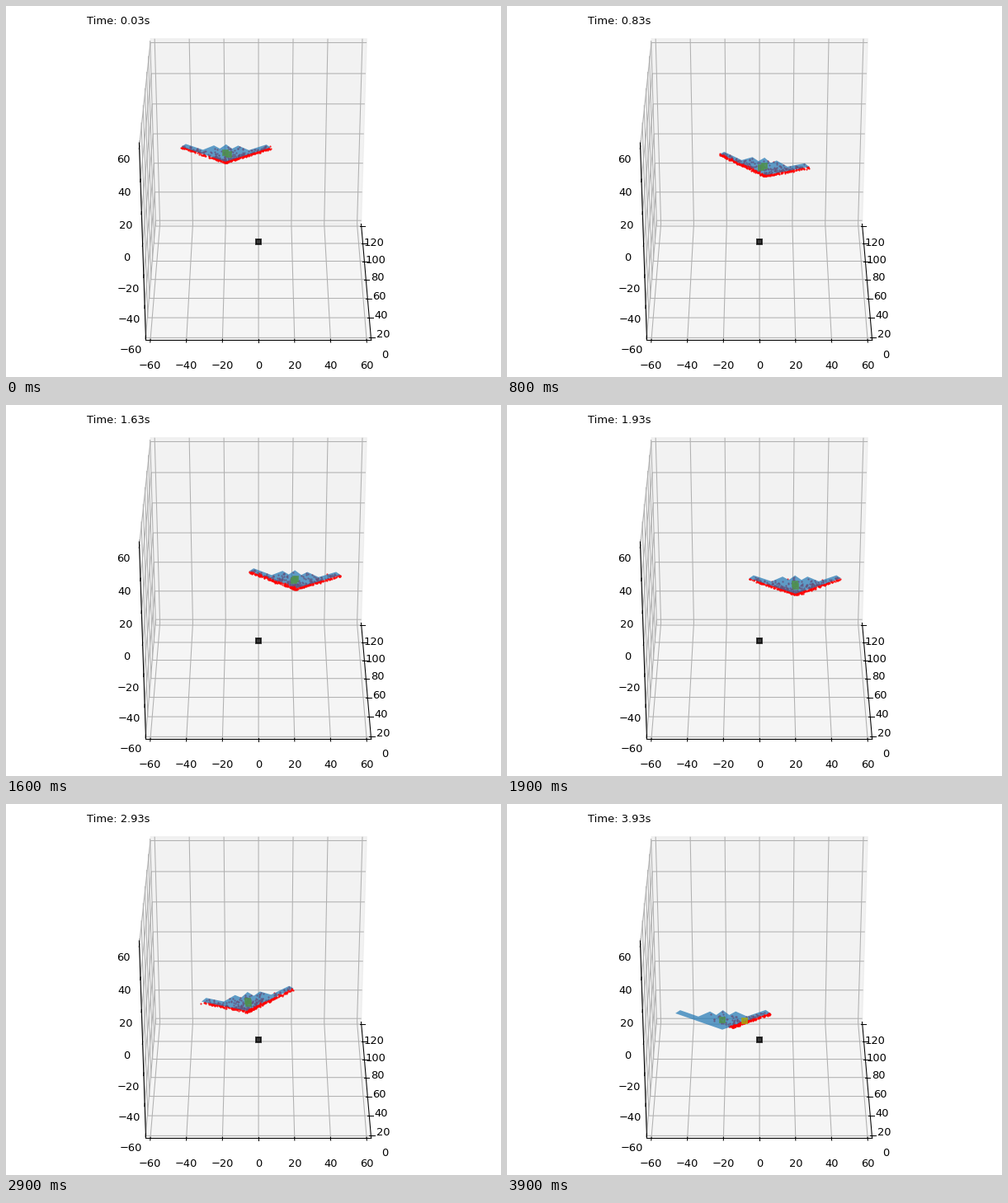
Animation of 600 by 450 pixels, one loop 4 s. Source, as a matplotlib script:

```python
import numpy as np
import matplotlib.pyplot as plt
from matplotlib.animation import FuncAnimation
from mpl_toolkits.mplot3d.art3d import Poly3DCollection

FRAMES, INTERVAL = 40, 100
HALF_SPAN, NOSE, SWEEP = 26.2, -10.6, 0.668
FOV_SLOPE = 1.15  # lateral limit of the sensor per unit of range
HITS = 420

# Trailing edge of the right half, from centre line to wing tip
REAR_X = np.array([0, 3.6, 7.1, 13.4, 23.7, HALF_SPAN])
REAR_Y = np.array([10.2, 5.0, 8.8, 3.4, 10.3, 6.9])

ROLL_T = np.array([0, 0.4, 0.83, 1.23, 1.93, 2.33, 2.93, 3.45, 3.95])
ROLL_DEG = np.array([0, 6, 9.3, 5.5, 0, -7, -9.5, -5, 0])


def hermite(t, ts, vs):
    """Smooth curve through the points (ts, vs)."""
    slope = np.gradient(vs, ts)
    k = int(np.clip(np.searchsorted(ts, t, "right") - 1, 0, len(ts) - 2))
    h = ts[k + 1] - ts[k]
    u = (t - ts[k]) / h
    return ((1 + 2 * u) * (1 - u) ** 2 * vs[k]
            + u * (1 - u) ** 2 * h * slope[k]
            + u * u * (3 - 2 * u) * vs[k + 1]
            + u * u * (u - 1) * h * slope[k + 1])


def pose(t):
    x = 21.2 * np.sin(np.pi * t / 2 - 1.17)
    y = 100 - 20 * t
    return x, y, np.radians(hermite(t, ROLL_T, ROLL_DEG))


def place(lx, ly, x, y, roll):
    """Wing coordinates to scene coordinates, one row per point."""
    return np.column_stack([x + lx * np.cos(roll), y + ly, -lx * np.sin(roll)])


def outline():
    right = np.column_stack([REAR_X, REAR_Y])
    left = right[:0:-1] * [-1, 1]
    return np.vstack([[0, NOSE], left, right]).T


def scan(rng, x, y, roll):
    """Simulated returns: scene points and a mask of those on top."""
    n = 3 * HITS
    side = rng.choice([-1, 1], n)
    span = HALF_SPAN * rng.random(n) ** 1.3
    chord = rng.random(n) ** 3.5
    front = NOSE + SWEEP * span
    ly = front + chord * (np.interp(span, REAR_X, REAR_Y) - front)
    pts = place(side * span, ly, x, y, roll)

    # Nearer parts of the wing return more points
    weight = 1 / (pts ** 2).sum(axis=1)
    pick = rng.choice(n, HITS, replace=False, p=weight / weight.sum())
    seen = np.abs(pts[pick, 0]) < FOV_SLOPE * pts[pick, 1]
    clipped = seen.mean() < 0.85
    pick = pick[seen]

    raised = (-side * roll > np.radians(2)) | (clipped & (side > 0))
    top = (raised & (chord < 0.12))[pick]
    noise = rng.normal(0, 0.3, (len(pick), 3)) - [0, 0, 0.5]
    return pts[pick] + noise, top, clipped


fig = plt.figure(figsize=(6.4, 4.8), dpi=93.75)
ax = fig.add_axes([0, 0, 1, 1], projection="3d", computed_zorder=False)


def markers(zorder, color, marker="s", size=4.47, edge=1.5, alpha=0.75):
    return ax.plot([], [], [], ls="", marker=marker, ms=size, mew=edge,
                   color=color, alpha=alpha, zorder=zorder)[0]


wing_x, wing_y = outline()
dots = dict(color="red", marker="o", size=1.7, edge=0, alpha=0.85)
low_hits = markers(2, **dots)
top_hits = markers(4, **dots)
wing = Poly3DCollection([place(wing_x, wing_y, *pose(0))], facecolors="tab:blue",
                        alpha=0.7, linewidths=0, zorder=3)
ax.add_collection3d(wing)
estimate = markers(5, "#4f9150")
centre = markers(6, "#4f9150")
sensor = markers(7, "black")
sensor.set_data_3d([0], [0], [0])
label = ax.text2D(0.05, 0.95, "", transform=ax.transAxes)

ax.set_box_aspect((1, 1, 1))
ax.view_init(elev=30, azim=-89.9999)
ax.set_xticks(range(-60, 61, 20))
ax.set_yticks(range(0, 121, 20))
ax.set_zticks(range(-60, 61, 20))
ax.set_xlim(-62.5, 62.5)
ax.set_ylim(-2.5, 122.5)
ax.set_zlim(-62.5, 62.5)
ax.zaxis.set_ticks_position("lower")


def update(i):
    t = i * INTERVAL / 1000 + 1 / 30
    x, y, roll = pose(t)
    hits, top, clipped = scan(np.random.default_rng(i), x, y, roll)

    wing.set_verts([place(wing_x, wing_y, x, y, roll)])
    low_hits.set_data_3d(*hits[~top].T)
    top_hits.set_data_3d(*hits[top].T)
    estimate.set_data_3d(*hits.mean(axis=0)[:, None])
    estimate.set_color("#a8a80c" if clipped else "#4f9150")
    centre.set_data_3d([x], [y], [0])
    label.set_text(f"Time: {t:.2f}s")
    return wing, low_hits, top_hits, estimate, centre, label


anim = FuncAnimation(fig, update, frames=FRAMES, interval=INTERVAL,
                     repeat=True, repeat_delay=0, blit=False)
plt.show()
```
